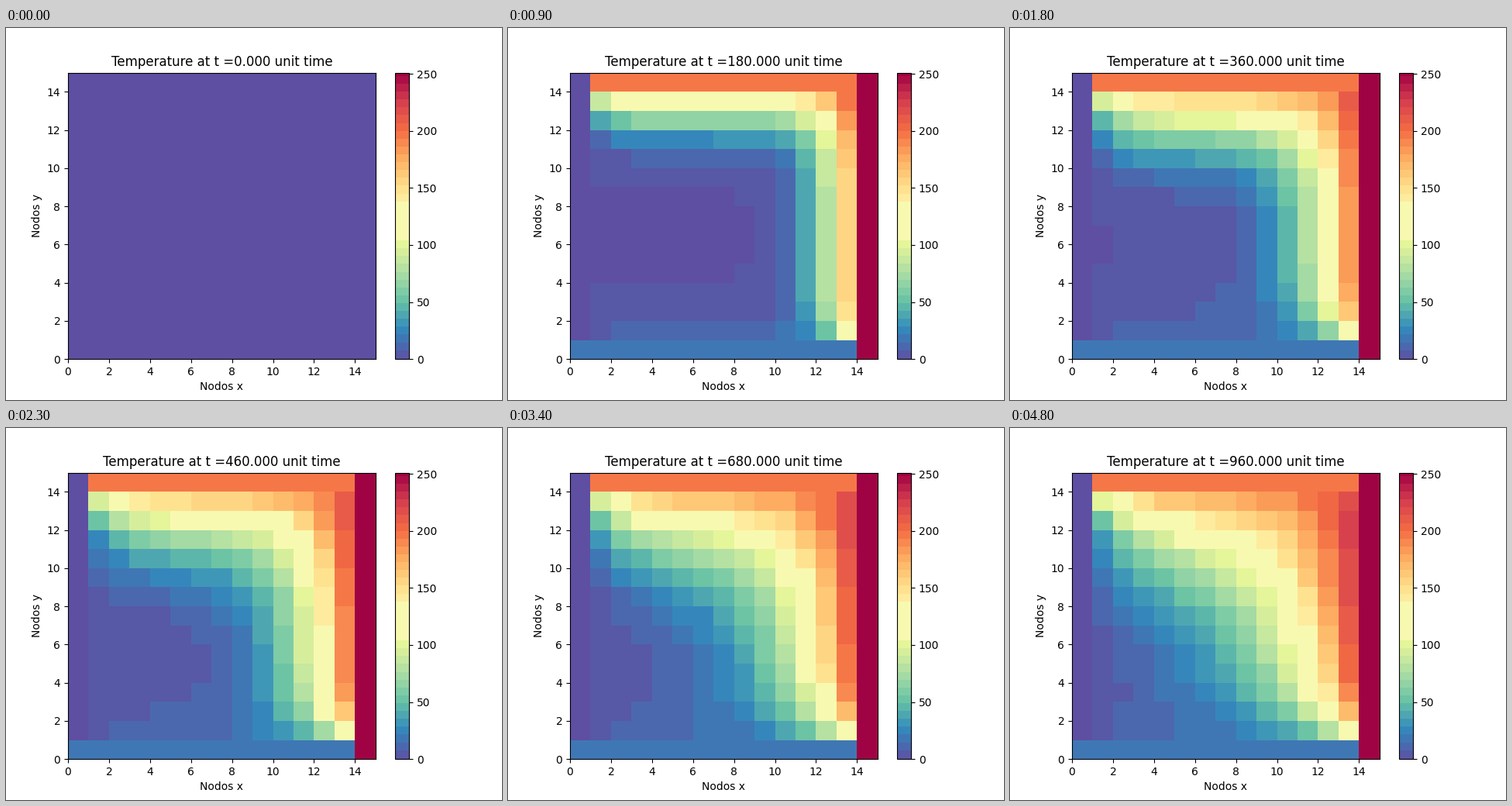
Write a matplotlib script that moves like this. It is 640x480 px and loops after 4.9 s.

```python
import numpy as np
import matplotlib.pyplot as plt
from matplotlib.animation import FuncAnimation
from matplotlib.colors import ListedColormap

N = 15            # nodes per side
FRAMES = 49
DT = 20.0         # time units per frame
R = 0.2482        # diffusion number per step
V_MAX = 251.0
LEFT, TOP, RIGHT, BOTTOM = 0, 200, 250, 15


def banded_cmap(width=7, pale=(16, 20)):
    """Spectral_r in equal bands; the pale middle is one wide band."""
    colors = plt.get_cmap("Spectral_r")(np.arange(256))
    band = (np.arange(256) + width - 1) // width
    band[(band >= pale[0]) & (band <= pale[1])] = pale[0]
    for b in np.unique(band):
        colors[band == b] = colors[band == b].mean(axis=0)
    return ListedColormap(colors)


def set_walls(u):
    u[:, 0] = LEFT
    u[-1, 1:] = TOP
    u[0, :] = BOTTOM
    u[:, -1] = RIGHT


def step(u):
    """One explicit step of the heat equation, walls held fixed."""
    new = u.copy()
    new[1:-1, 1:-1] += R * (u[2:, 1:-1] + u[:-2, 1:-1] + u[1:-1, 2:]
                            + u[1:-1, :-2] - 4 * u[1:-1, 1:-1])
    set_walls(new)
    return new


states = [np.zeros((N, N))]
while len(states) < FRAMES:
    states.append(step(states[-1]))

fig, ax = plt.subplots(figsize=(6.4, 4.8), dpi=100)
edges = np.arange(N + 1)
mesh = ax.pcolormesh(edges, edges, states[0], cmap=banded_cmap(),
                     vmin=0, vmax=V_MAX)
fig.colorbar(mesh, ax=ax)
ax.set_xlabel("Nodos x")
ax.set_ylabel("Nodos y")
title = ax.set_title("")


def update(i):
    mesh.set_array(states[i])
    title.set_text(f"Temperature at t ={i * DT:.3f} unit time")
    return mesh, title


anim = FuncAnimation(fig, update, frames=FRAMES, interval=100, repeat=True,
                     repeat_delay=0, blit=False)
plt.show()
```
